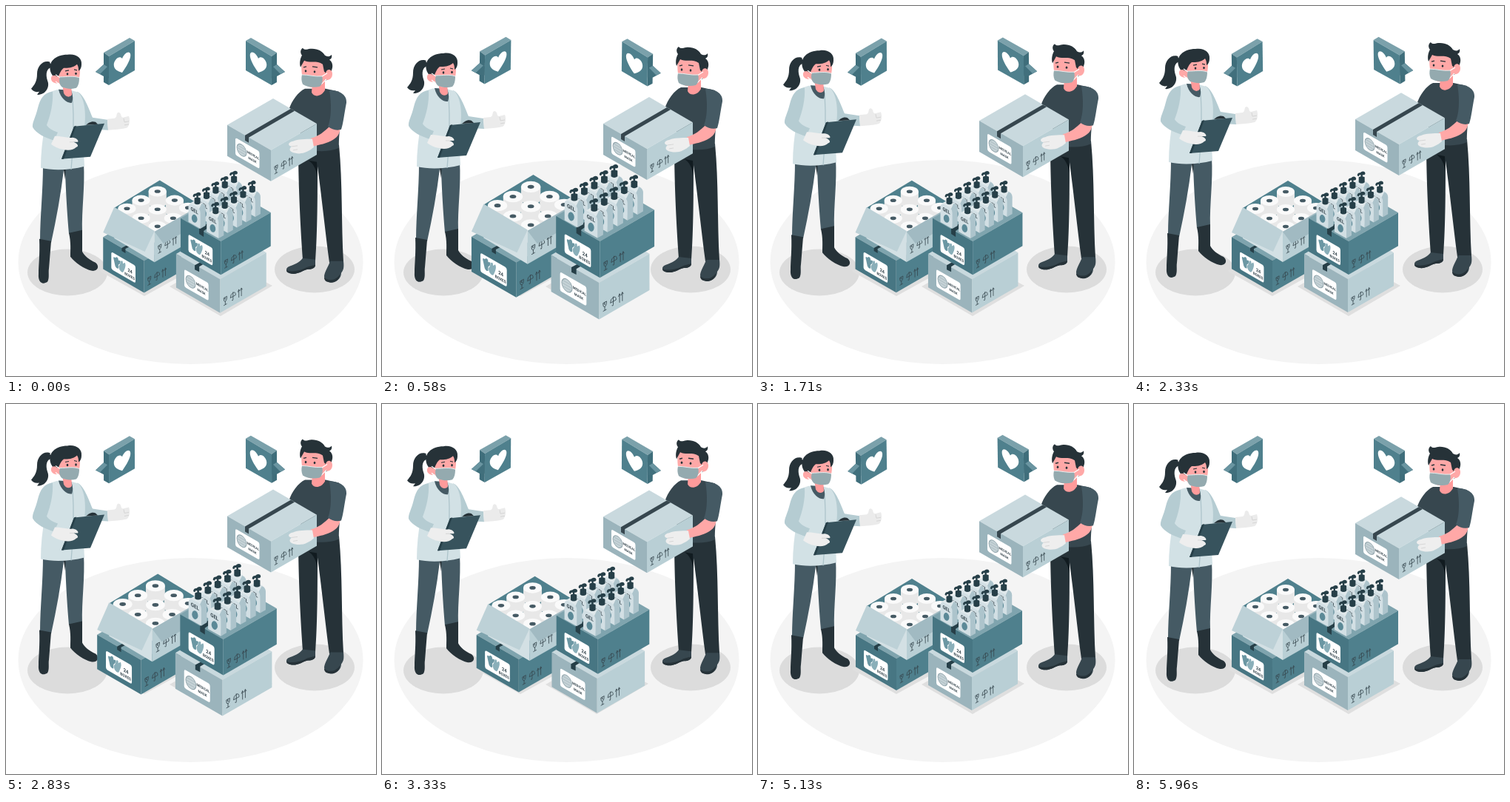
An HTML page for the animation above (6000 ms loop, 500x500 px).

```html
<!DOCTYPE html>
<html lang="en">
<head>
<meta charset="utf-8">
<title>Medical supplies</title>
<style>
html, body { margin: 0; width: 100%; height: 100%; overflow: hidden; background: #fff; }
svg { display: block; width: 100vw; height: 100vh; }
text { font-family: Roboto, "Liberation Sans", sans-serif; font-weight: 700; fill: #37474f; }
</style>
</head>
<body>
<svg viewBox="0 0 500 500">
  <ellipse cx="249.5" cy="346" rx="233" ry="138" fill="#f4f4f4"/>
  <g fill="#dcdcdc">
    <ellipse cx="83" cy="360" rx="54" ry="31.5"/>
    <ellipse cx="417" cy="356" rx="54" ry="31.5"/>
    <path d="M221 379L290 419L360 378L290 340ZM126 358L187 392L245 360L190 325Z" fill="#dfdfdf"/>
  </g>

  <g id="woman">
    <path d="M50 215C50 250 46 285 46 317L61 320C68 288 74 255 78 222L80 224C81 255 83 285 85 308L103 306C102 275 107 245 105 212Z" fill="#455a64"/>
    <path d="M78 222L81 212L80 235Z" fill="#263238"/>
    <path d="M45 315C46 335 44 350 44 362C43 375 50 377 56 373C59 368 57 360 58 355L61 318ZM85 307C88 320 87 329 87 339C93 347 106 356 116 358C124 359 127 352 121 347C112 343 106 338 103 332V303Z" fill="#263238"/>
    <path d="M96 116C105 119 112 139 117 151L137 154L138 168L104 166Z" fill="#b5ccd2"/>
    <path d="M137 153L147 152C151 150 148 145 152 144C157 145 154 150 158 151L166 149C168 154 167 163 163 165C155 167 146 167 138 168Z" fill="#ebebeb"/>
    <path d="M159 152L160 157M160 157L166 156M160 161L166 160" fill="none" stroke="#ccc" stroke-width=".7"/>
    <path d="M72 113C60 115 52 119 51 130L53 160C49 180 47 200 47 219C64 223 87 222 106 217L104 178C109 152 108 128 98 117L87 114Z" fill="#d2e1e5"/>
    <path d="M90 123C92 155 91 190 88 221" fill="none" stroke="#adc4cb" stroke-width="1.3"/>
    <path d="M71 113C74 126 83 132 89 131C91 125 90 119 88 114Z" fill="#455a64"/>
    <path d="M76 105L78 118C81 124 87 124 89 120L88 106Z" fill="#ff9b9b"/>
    <path d="M62 77C52 71 42 80 42 92C42 103 38 107 34 112C37 116 40 117 45 116L42 120C53 121 60 110 56 101C53 92 55 84 62 83Z" fill="#263238"/>
    <path d="M60 76L64 84" stroke="#fff" stroke-width="2"/>
    <path d="M68 84C66 94 70 108 80 112C94 112 100 102 100 88L96 77Z" fill="#ffa8a7"/>
    <path d="M61 91C55 76 67 66 83 66C94 64 103 70 102 79C102 84 100 87 98 88C98 85 98 82 96 79C90 84 84 84 78 84C74 87 73 91 71 95L64 96Z" fill="#263238"/>
    <path d="M71 99C69 93 62 92 61 97C60 103 67 106 71 104Z" fill="#ffa8a7"/>
    <path d="M67 93L73 97M67 102L77 110" stroke="#fff" stroke-width="1.2"/>
    <path d="M73 96C83 96 91 94 99 97C99 103 98 108 95 111C89 113 82 112 76 110C72 107 71 101 73 96Z" fill="#94aaaf"/>
    <path d="M73 96C83 96 91 94 99 97" fill="none" stroke="#e6eeef" stroke-width="1"/>
    <path d="M80 88L85 87M92 86L96 87" stroke="#263238" stroke-width="1.1"/>
    <g fill="#263238"><ellipse cx="83" cy="92" rx="1.3" ry="1.7"/><ellipse cx="94.5" cy="91.5" rx="1.3" ry="1.7"/></g>
    <path d="M92 163L133 159L114 204L75 207Z" fill="#37535d"/>
    <path d="M92 163L95 162L78 207H75Z" fill="#263f48"/>
    <path d="M108 161L112 158C115 156 119 156 121 157L124 160Z" fill="#263238"/>
    <path d="M63 116C51 117 46 126 43 138C40 151 35 158 36 164C41 173 53 178 65 182L70 171C63 169 56 164 55 161C60 148 64 132 63 116Z" fill="#b5ccd2"/>
    <path d="M66 176C74 176 83 179 90 178C94 178 99 182 97 184L91 184C97 186 99 190 95 191C91 195 84 196 77 194C70 193 65 190 61 187Z" fill="#eee"/>
    <path d="M91 184L86 184" stroke="#ccc" stroke-width=".7"/>
  </g>

  <g id="man">
    <path d="M395 190C395 245 398 300 401 343L418 345C421 305 421 250 421 217C427 262 432 310 437 347L456 346C453 295 455 240 450 188Z" fill="#263238"/>
    <path d="M409 209L420 211L421 232C419 220 415 213 409 209Z" fill="#111b20"/>
    <path d="M401 341C397 347 388 350 381 353C377 356 379 361 386 362C395 363 402 357 408 356C414 356 418 354 418 350V343ZM438 345C436 352 431 358 430 365C430 372 436 375 443 373C450 371 453 366 453 361C456 357 457 354 456 345Z" fill="#37474f"/>
    <path d="M379 357C383 360 397 359 407 353L418 350C418 354 414 356 408 356C402 357 395 363 386 362C381 361 379 360 379 357ZM430 367C435 372 446 372 451 363C451 369 447 373 441 374C434 374 430 372 430 367Z" fill="#263238"/>
    <path d="M404 112C395 116 386 128 382 141L388 160L418 196C431 197 441 196 450 192C449 168 457 139 450 116L432 112Z" fill="#37474f"/>
    <path d="M414 104L413 117C416 124 426 123 431 114L431 100Z" fill="#ff9b9b"/>
    <path d="M400 74C398 88 400 107 411 110C424 111 432 103 434 92L434 74Z" fill="#ffa8a7"/>
    <path d="M398 83C396 77 398 70 400 67C397 63 398 59 401 57C403 60 406 59 411 58C420 57 428 61 431 67C434 69 438 69 440 66C441 70 439 72 437 73C442 76 442 83 440 87C440 94 437 99 432 101C433 93 432 89 430 89L428 79C420 73 411 78 403 74Z" fill="#263238"/>
    <path d="M432 91C433 84 441 85 441 92C441 99 435 102 431 99Z" fill="#ffa8a7"/>
    <path d="M426 96L434 91M426 106L433 99" stroke="#fff" stroke-width="1.2"/>
    <path d="M400 93C409 93 417 96 427 95C429 100 427 107 424 109C416 111 407 110 401 106C399 102 399 97 400 93Z" fill="#94aaaf"/>
    <path d="M400 93C409 93 417 96 427 95" fill="none" stroke="#e6eeef" stroke-width="1"/>
    <path d="M402 83L406 82M414 82L421 83" stroke="#263238" stroke-width="1.4"/>
    <g fill="#263238"><ellipse cx="405" cy="88" rx="1.3" ry="1.7"/><ellipse cx="417" cy="89" rx="1.3" ry="1.7"/></g>
    <g id="carried"></g>
    <path d="M452 158C453 170 449 177 442 181C434 186 423 188 414 190L412 179C421 177 431 170 439 161Z" fill="#ffa8a7"/>
    <path d="M437 114C453 114 461 122 460 131C457 146 456 158 453 167C447 169 440 167 435 163C440 151 440 132 437 114Z" fill="#455a64"/>
    <path d="M414 180C405 180 394 180 388 183C381 184 380 189 386 190C381 194 384 198 391 199C401 201 409 197 416 191Z" fill="#eee"/>
    <path d="M386 190L394 189M388 195L394 194" stroke="#ccc" stroke-width=".7"/>
  </g>

  <g id="stack"></g>
  <g id="bubbles"></g>
</svg>
<script>
const $ = id => document.getElementById(id);
const path = (d, fill, extra = '') => `<path d="${d}" fill="${fill}" ${extra}/>`;
const poly = (points, fill) => `<polygon points="${points}" fill="${fill}"/>`;
const at = (x, y, body) => `<g transform="translate(${x} ${y})">${body}</g>`;
const onLeft = (x, y, body) => `<g transform="matrix(.866 .5 0 1 ${x} ${y})">${body}</g>`;
const onRight = (x, y, body) => `<g transform="matrix(.866 -.5 0 1 ${x} ${y})">${body}</g>`;
const word = (x, y, size, s) => `<text x="${x}" y="${y}" font-size="${size}" text-anchor="middle">${s}</text>`;

const SLOPE = .577;
const LIGHT = ['#c9d9de', '#9bb4bc', '#b9cfd5'];
const TEAL = ['#7fa4ae', '#477683', '#4f808d'];

// Isometric box whose front top corner is (x, y)
function box(x, y, a, b, h, [top, left, right]) {
  const la = y - a * SLOPE, rb = y - b * SLOPE;
  return poly([x, y, x - a, la, x - a + b, la - b * SLOPE, x + b, rb], top)
    + poly([x, y, x - a, la, x - a, la + h, x, y + h], left)
    + poly([x, y, x + b, rb, x + b, rb + h, x, y + h], right);
}

const icons = (x, y) => onRight(x, y, `<g fill="none" stroke="#37474f" stroke-width=".75">
  <path d="M-2.5-5H2.5L2-1Q0 2-2-1ZM0 0V5M-2.5 5H2.5M0-5L-1-3L1-2"/>
  <path d="M8 0Q8-5 12-5T16 0ZM12-6V4Q12 6 10 4"/>
  <path d="M21 6V-4M19.5-2L21-5L22.5-2M25 6V-4M23.5-2L25-5L26.5-2"/></g>`);

function label(x, y, kind) {
  let art;
  if (kind === 'gloves') {
    art = path('M4 9Q2 4 6 5L8 3Q11 2 11 6L14 5Q15 8 11 12L11 17Q8 19 6 16Z', '#6b97a3')
      + path('M13 18Q10 14 13 11L15 5Q18 2 18 7L21 4Q23 6 21 12L19 17Q17 21 13 18Z', '#8aafb9')
      + word(29, 13.5, 6.3, '24') + word(28.5, 20, 5, 'BOXES');
  } else {
    art = '<circle cx="9.8" cy="12" r="7.5" fill="#c5d2d6" stroke="#90a4ab"/>'
      + path('M3.5 8.5H16M2.8 12H16.8M3.5 15.5H16', 'none', 'stroke="#a9bac0" stroke-width=".8"')
      + word(27.5, 11.5, 4.5, 'MEDICAL') + word(26.5, 18.5, 4.5, 'MASK');
  }
  return onLeft(x, y, '<rect width="37.5" height="23.5" rx="2.5" fill="#fff"/>' + art);
}

const roll = (x, y) => at(x, y,
  path('M-12 0V15A12 7 0 0 0 12 15V0Z', '#e8e8e8')
  + '<ellipse rx="12" ry="7" fill="#fafafa"/><ellipse rx="4" ry="2.3" fill="#455a64"/>');

const bottle = (x, y) => at(x, y,
  path('M-10 0L-3-4L6-1Q11 2 11 9L4 13Z', '#dfe8eb')
  + path('M2 8L6 0Q11 2 11 7V30L4 34Z', '#adc4cc')
  + path('M-12 5Q-12 0-8 1L0 5Q4 8 4 13V34L-12 25Z', '#d2dfe4')
  + path('M-4-7Q0-9 4-7V0Q0 3-4 0ZM-1.2-11H1.2V-5H-1.2ZM-6-9Q-6-13-2-13Q1-16 4-14Q6-11 3-10L-3-10L-4-8Z', '#263f48')
  + onLeft(-4, 12, word(0, 0, 6.6, 'GEL'))
  + '<ellipse cx="-4" cy="20.5" rx="3.7" ry="5.5" fill="#5b8997" transform="rotate(-12 -4 20)"/>');

function openBox() {
  const rolls = [[205, 251], [183, 263], [228, 263], [164, 274], [205, 275], [246, 273], [183, 287], [226, 287], [205, 298]];
  return poly('147,273 208,236 262,269 201,305', '#4f808d')
    + rolls.map(p => roll(...p)).join('')
    + poly('147,273 201,305 201,346 147,314', '#d3e0e4')
    + poly('201,305 262,270 262,311 201,346', '#b9cfd5')
    + icons(208, 328)
    + poly('201,305 262,270 272,288 213,321', '#a1bac2')
    + poly('147,272 201,304 188,332 132,306', '#bdd1d7');
}

function bottles() {
  let out = '';
  for (const [x, y] of [[258.5, 267], [283, 280]])
    for (let i = 4; i >= 0; i--) out += bottle(x + 12.3 * i, y - 7.2 * i);
  return out;
}

$('stack').innerHTML =
  box(187, 344, 55, 50, 43, TEAL)
  + path('M157 327L168 321V325L162 328V334L157 331Z', '#263f48')
  + label(143, 332, 'gloves') + icons(194, 371)
  + openBox()
  + box(289, 369, 59, 62, 45, LIGHT)
  + path('M255 350L268 343L271 346L261 352V359L255 356Z', '#263f48')
  + label(241, 355.5, 'mask') + icons(296, 398)
  + box(290, 318, 54, 67, 45, TEAL)
  + path('M261 301L272 294L277 297L267 304V312L261 308Z', '#263f48')
  + label(246.5, 308.5, 'gloves') + icons(297, 348)
  + bottles();

$('carried').innerHTML =
  box(358, 195, 59, 62, 42, LIGHT)
  + path('M323 175L385 139L390 142L328 178V185L323 182Z', '#37474f')
  + label(310, 178, 'mask') + icons(365, 221);

const bubble =
  poly('132,63 167,43 174,47 139,68', '#7ba1ab')
  + poly('132,63 139,68 139,107 132,103', '#3f6e7b')
  + poly('121,89 132,79 139,83 139,95 132,95', '#41707d')
  + poly('121,89 132,79 137,82 127,92', '#6a95a1')
  + poly('139,68 174,47 174,87 139,107', '#4f808d')
  + onRight(157, 77, path('M0 13C-7 8-13 2-13-4C-13-11-4-13 0-6C4-13 13-11 13-4C13 2 7 8 0 13Z', '#fff'));
$('bubbles').innerHTML = bubble + `<g transform="matrix(-1 0 0 1 498 0)">${bubble}</g>`;

const LOOP = 6000;
const BEATS = [[0, 1], [.1, 1.1], [.3, 1], [.4, 1], [.5, 1.1], [.6, 1], [1, 1]];

function beat(p) {
  const i = BEATS.findIndex(([end]) => end > p);
  const [a, from] = BEATS[i - 1], [b, to] = BEATS[i];
  return from + (to - from) * (p - a) / (b - a);
}

function draw(now) {
  const p = (now + 40) % LOOP / LOOP;
  const lift = -10 * (1 - Math.abs(2 * p - 1));
  const sway = Math.asin(Math.sin(4 * Math.PI * p)) * 2 / Math.PI;
  const move = (id, t) => $(id).setAttribute('transform', t);
  move('woman', `translate(0 ${lift})`);
  move('man', `translate(0 ${lift})`);
  move('stack', `translate(244.5 318.5) scale(${beat(p)}) translate(-244.5 -318.5)`);
  move('bubbles', `rotate(${sway} 249 75)`);
}

const start = performance.now();
function tick() {
  draw(performance.now() - start);
  requestAnimationFrame(tick);
}
tick();
</script>
</body>
</html>
```
